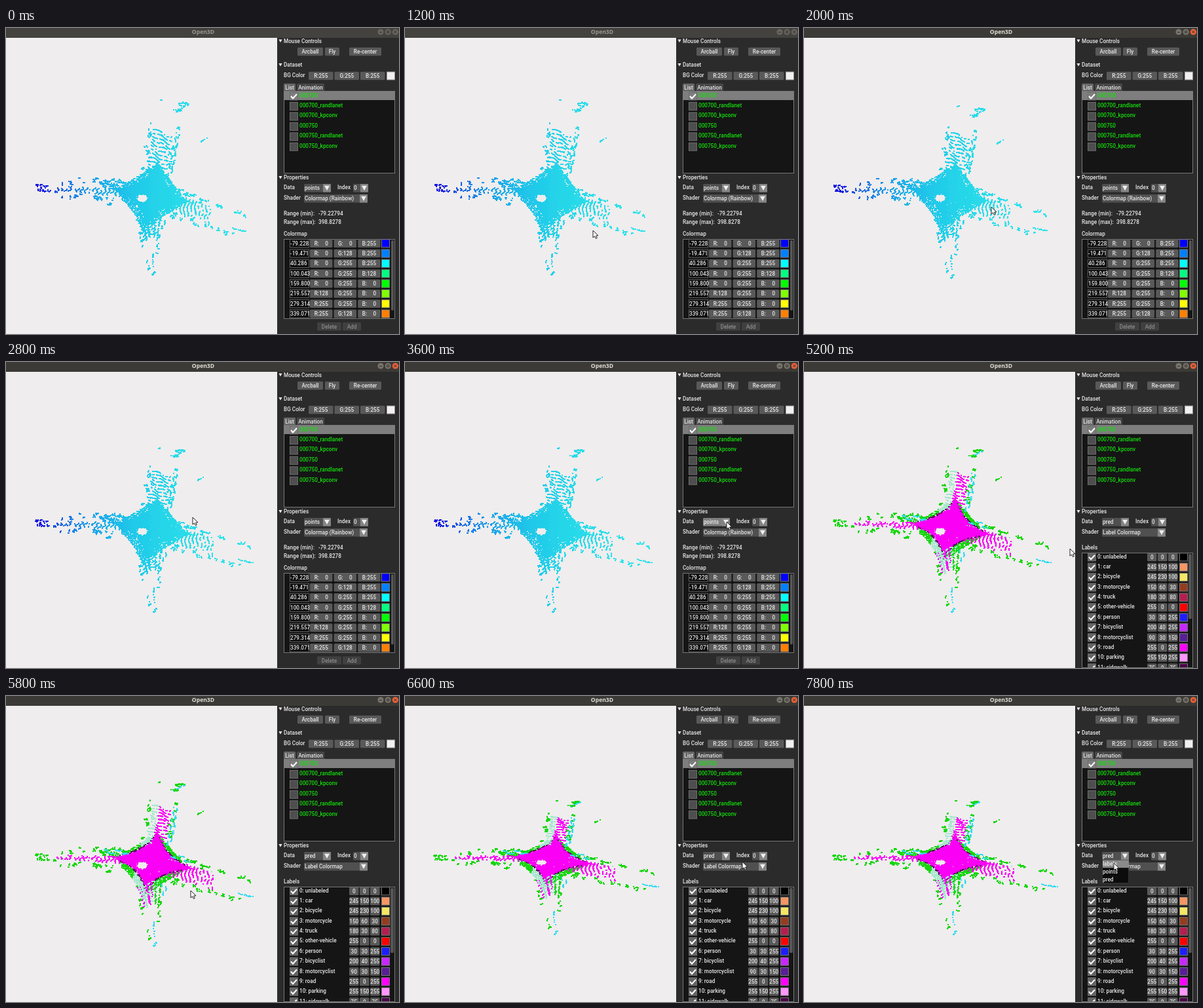
Write an HTML page with a canvas that moves like this. It is 600 by 467 pixels and loops after 8 s.

```html
<!DOCTYPE html>
<html lang="en">
<head>
<meta charset="utf-8">
<title>Point cloud viewer</title>
<style>
html, body { margin: 0; width: 100%; height: 100%; overflow: hidden; background: #efedee; }
canvas { display: block; width: 100%; height: 100%; }
</style>
</head>
<body>
<canvas id="stage" width="600" height="467"></canvas>
<script>
const ctx = document.getElementById('stage').getContext('2d');
const LOOP = 8000, STEP = 200;
const ROAD = '#fa00f5', WALK = '#a5e8cc', TREE = '#16d60c', WALL = '#35dcf0', CURB = '#5a0a5e';

// ---------- helpers ----------
let seed = 7;
function rnd() {
  seed = (seed + 0x6D2B79F5) | 0;
  let v = Math.imul(seed ^ (seed >>> 15), 1 | seed);
  v = (v + Math.imul(v ^ (v >>> 7), 61 | v)) ^ v;
  return ((v ^ (v >>> 14)) >>> 0) / 4294967296;
}
const mix = (a, b, k) => a + (b - a) * k;
const jit = r => (rnd() * 2 - 1) * r;
const clamp = (v, lo, hi) => Math.min(hi, Math.max(lo, v));

// ---------- point cloud ----------
const CX = 208, CY = 260;
const points = [];

function rainbow(x) {
  const hue = clamp(182 + 58 * Math.exp((55 - x) / 70), 180, 240);
  return `hsl(${Math.round(hue)}, 82%, ${Math.round(47 + x / 40)}%)`;
}

// The scanner leaves an empty spot around itself
function dot(x, y, label) {
  if (Math.hypot((x - CX) / 9, (y - CY) / 6) < 0.8 + rnd() * 0.25) return;
  points.push({ x: x - CX, y: y - CY, label, hue: rainbow(x + jit(3)) });
}

function blob(x, y, rx, ry, label) {
  for (let n = Math.max(3, rx * ry * 0.9); n > 0; n--) {
    const a = rnd() * Math.PI * 2, r = Math.sqrt(rnd());
    dot(x + Math.cos(a) * r * rx, y + Math.sin(a) * r * ry, label);
  }
}

function line(x0, y0, x1, y1, label) {
  const len = Math.hypot(x1 - x0, y1 - y0);
  for (let d = 0; d < len; d += rnd() < 0.15 ? 3 : 0.8)
    dot(mix(x0, x1, d / len) + jit(0.8), mix(y0, y1, d / len) + jit(0.8), label);
}

// Star-shaped road surface with pavements and trees in its corners
function crossing(cx, cy) {
  for (let y = -56; y < 56; y += 1.6) {
    for (let x = -70; x < 70; x += 1.6) {
      const p = 0.97 * x + 0.2 * y, q = 0.17 * x - 0.98 * y;
      const star = Math.pow(Math.abs(p) / 70, 0.6) + Math.pow(Math.abs(q) / (q > 0 ? 58 : 48), 0.6);
      const edge = Math.abs(p) / 54 + Math.abs(q) / 50;
      const label = star < 1 ? ROAD : star < 1.05 ? CURB : p < 0 && p > -22 ? WALK : TREE;
      if (star < 1 || (edge < 1 && rnd() < 0.8)) dot(cx + x + jit(0.3), cy + y + jit(0.3), label);
    }
  }
}

// One street: scan arcs across the road, trees and a stepped wall beside it
function arm({ from: [x0, y0], to: [x1, y1], half, end = half, arcs, reach, slant = 0, road = -1, trees, spread, wall, wallEnd }) {
  const len = Math.hypot(x1 - x0, y1 - y0), ux = (x1 - x0) / len, uy = (y1 - y0) / len;
  const put = (draw, u, v, ...rest) =>
    draw(x0 + ux * u * len - uy * v, y0 + uy * u * len + ux * v, ...rest);

  for (let i = 0; i < arcs; i++) {
    const u = i / arcs * reach, w = mix(half, end, u) * (0.85 + rnd() * 0.25);
    for (let v = -1; v <= 1; v += 0.8 / w) {
      if (rnd() < 0.02 + u * 0.12) { v += 3 / w; continue; }
      const wave = slant * v + 1.5 * Math.sin(4 * v + i * 0.8);
      put(dot, u + (wave + jit(0.4)) / len, v * w, v > road ? ROAD : WALK);
    }
  }
  for (let i = 0; i < trees; i++) {
    const u = rnd(), side = rnd() < 0.5 ? -1 : 1;
    const v = side * (mix(half, end, u) + 1 + rnd() * spread);
    put(blob, u, v, 1 + rnd() * 4 * (1 - u / 2), 1 + rnd() * 2.2, TREE);
  }
  for (let u = 0; u < wallEnd; u += 0.9 / len) {
    const v = half + 5 + Math.floor(u * 12) % 2 * 5;
    if (rnd() < 0.8) put(dot, u, wall * v + jit(1.2), WALL);
  }
}

function buildCloud() {
  crossing(222, 256);
  arm({ from: [228, 224], to: [244, 144], half: 14, end: 17, arcs: 13, reach: 0.85, slant: -4,
    road: -0.3, trees: 24, spread: 6, wall: 1, wallEnd: 0.85 });
  arm({ from: [246, 264], to: [362, 303], half: 13, arcs: 13, reach: 0.6, slant: 3,
    trees: 38, spread: 8, wall: -1, wallEnd: 0.25 });
  arm({ from: [186, 252], to: [60, 243], half: 6, end: 3, arcs: 19, reach: 0.88, slant: -2,
    trees: 46, spread: 13, wall: 1, wallEnd: 0.3 });
  arm({ from: [216, 290], to: [225, 368], half: 15, end: 3, arcs: 7, reach: 0.4, slant: 4,
    road: 0.7, trees: 15, spread: 3, wall: -1, wallEnd: 0.25 });

  // streaks towards the lower end, where the beams converge
  for (let i = 0; i < 6; i++)
    line(200 + i * 7, 286, 211 + i * 4, 304 + rnd() * 24, i < 2 ? WALK : i < 4 ? ROAD : TREE);
  line(224, 345, 225, 364, WALL);
  line(223, 377, 228, 371, WALL);

  // far ends
  blob(271, 116, 9, 3.5, TREE);
  line(279, 116, 260, 128, WALL);
  blob(262, 126, 6, 2.5, TREE);
  blob(237, 110, 2, 1.5, TREE);
  line(297, 174, 307, 168, TREE);
  line(347, 306, 366, 311, WALL);
  for (let i = 0; i < 5; i++) blob(49 + i * 3, 240 + i * 7 % 13, 3.5, 2.5, TREE);
}

// Perspective view of the ground, tilted in equal turns
function drawCloud(turn, labelled) {
  const angle = 0.37 * turn, squash = Math.cos(angle), depth = Math.sin(angle) / 420;
  const cy = CY - 1.5 * turn * turn, zoom = 1 + 0.02 * turn;
  for (const { x, y, label, hue } of points) {
    const s = zoom / (1 - y * depth);
    ctx.fillStyle = labelled ? label : hue;
    ctx.fillRect(Math.round(CX + x * s) - 1, Math.round(cy + y * s * squash - 0.015 * turn * x) - 1, 2, 2);
  }
}

// ---------- widgets ----------
const FONT = 'Roboto, Arial, sans-serif';
function rect(x, y, w, h, fill) {
  ctx.fillStyle = fill;
  ctx.fillRect(x, y, w, h);
}
function frame(x, y, w, h, fill, edge) {
  rect(x, y, w, h, edge);
  rect(x + 1, y + 1, w - 2, h - 2, fill);
}
function text(s, x, y, color = '#e8e8e8', align = 'left') {
  ctx.font = '500 8.2px ' + FONT;
  ctx.textAlign = align;
  ctx.textBaseline = 'middle';
  ctx.fillStyle = color;
  ctx.fillText(s, x, y + 0.6);
}
function round(x, y, w, h, fill) {
  ctx.fillStyle = fill;
  ctx.beginPath();
  ctx.roundRect(x, y, w, h, 1.5);
  ctx.fill();
}
function button(s, x, y, w, fill = '#595959', color) {
  round(x, y - 6.3, w, 12.6, fill);
  text(s, x + w / 2, y, color, 'center');
}
function poly(fill, ...p) {
  ctx.fillStyle = fill;
  ctx.beginPath();
  for (let i = 0; i < p.length; i += 2) ctx.lineTo(p[i], p[i + 1]);
  ctx.closePath();
  ctx.fill();
}
function down(x, y, r) {
  poly('#f0f0f0', x - r, y - r * 0.8, x + r, y - r * 0.8, x, y + r);
}
function section(s, y) {
  down(419, y, 2.6);
  text(s, 424, y);
}
function combo(s, x, y, w, [mx, my]) {
  const hover = mx > x && mx < x + w && Math.abs(my - y) < 7;
  round(x, y - 6, w, 12.5, hover ? '#808080' : '#505050');
  text(s, x + 1, y);
  rect(x + w - 12, y - 6, 12, 12.5, '#858585');
  down(x + w - 6, y, 4);
}
function check(x, y, on, fill = '#4e4e4e') {
  frame(x, y - 6.5, 13, 13, fill, '#6c6c6c');
  if (!on) return;
  ctx.strokeStyle = '#fff';
  ctx.lineWidth = 2;
  ctx.beginPath();
  ctx.moveTo(x + 2, y);
  ctx.lineTo(x + 5, y + 3.5);
  ctx.lineTo(x + 11, y - 3);
  ctx.stroke();
}
function swatch(y, rgb) {
  frame(573, y - 6.5, 13, 13, `rgb(${rgb})`, '#777');
}
function clipped(x, y, w, h, draw) {
  ctx.save();
  ctx.beginPath();
  ctx.rect(x, y, w, h);
  ctx.clip();
  draw();
  ctx.restore();
}

// ---------- window parts ----------
function drawTitle(active) {
  rect(0, 0, 600, 15, active ? '#3c3a36' : '#44423e');
  ctx.font = 'bold 8.6px "Noto Sans", sans-serif';
  ctx.textAlign = 'center';
  ctx.textBaseline = 'middle';
  ctx.fillStyle = active ? '#e2ded6' : '#9b9892';
  ctx.fillText('Open3D', 301, 6.5);
  for (let i = 0; i < 3; i++) {
    const x = 572 + i * 11.2;
    ctx.fillStyle = !active ? '#67645e' : i === 2 ? '#ee6238' : '#77736b';
    ctx.beginPath();
    ctx.arc(x, 6, 4.6, 0, 7);
    ctx.fill();
    ctx.strokeStyle = '#34322f';
    ctx.lineWidth = 1;
    ctx.beginPath();
    if (i === 0) { ctx.moveTo(x - 2, 6.5); ctx.lineTo(x + 2, 6.5); }
    else if (i === 1) ctx.rect(x - 1.5, 4.5, 3, 3);
    else {
      ctx.moveTo(x - 2, 4); ctx.lineTo(x + 2, 8);
      ctx.moveTo(x + 2, 4); ctx.lineTo(x - 2, 8);
    }
    ctx.stroke();
  }
}

const ITEMS = ['000700', '000750'].flatMap(s => [s, s + '_randlanet', s + '_kpconv']);

function drawPanel(data, shader, mouse) {
  rect(414, 14, 186, 453, '#2b2b2b');
  section('Mouse Controls', 19.5);
  button('Arcball', 445, 36, 39);
  button('Fly', 487, 36, 22);
  button('Re-center', 524, 36, 49);
  section('Dataset', 56);
  text('BG Color', 424, 72);
  ['R:255', 'G:255', 'B:255'].forEach((s, i) => button(s, 462 + i * 39.5, 73, 37.5));
  frame(581, 66.5, 13, 13, '#f2f0f1', '#999');
  button('List', 424, 91, 18, '#686868');
  button('Animation', 444, 91, 42, '#474747');

  frame(424, 96, 170, 126, '#151515', '#777');
  clipped(424, 97, 170, 124, () => {
    rect(424, 97, 170, 13, '#7e7e7e');
    ITEMS.forEach((s, i) => {
      const y = 102.5 + i * 15.45;
      check(433, y + 1.5, i === 0, i ? '#4e4e4e' : '#7e7e7e');
      text(s, 448, y, '#14e00c');
    });
  });

  section('Properties', 228);
  text('Data', 424, 243);
  combo(data, 455, 244, 41, mouse);
  text('Index', 506, 243);
  combo('0', 530, 244, 23, mouse);
  text('Shader', 424, 259);
  combo(shader, 455, 260, 97, mouse);
}

function drawColormap() {
  const min = -79.22794, max = 398.8278;
  text('Range (min):', 424, 283);
  text(min, 477, 283);
  text('Range (max):', 424, 296);
  text(max, 477, 296);
  text('Colormap', 424, 314);
  frame(424, 322, 170, 122, '#151515', '#777');
  for (let i = 0; i < 8; i++) {
    const y = 328.7 + i * 15.35;
    const rgb = [i - 4, Math.min(i, 8 - i), 4 - i].map(n => clamp(n * 128, 0, 255));
    frame(433, y - 6.5, 30, 13, '#0a0a0a', '#606060');
    text(mix(min, max, i / 8).toFixed(3), 434, y);
    rgb.forEach((n, j) =>
      button('RGB'[j] + ':' + String(n).padStart(3, '\u2007'), 464 + j * 36.6, y, 34.5));
    swatch(y, rgb);
  }
  round(588, 324, 4, 107, '#555');
  button('Delete', 475, 455.5, 37, '#404040', '#8c8c8c');
  button('Add', 514, 455.5, 28, '#404040', '#8c8c8c');
}

const CLASSES = [
  ['unlabeled', 0, 0, 0], ['car', 245, 150, 100], ['bicycle', 245, 230, 100],
  ['motorcycle', 150, 60, 30], ['truck', 180, 30, 80], ['other-vehicle', 255, 0, 0],
  ['person', 30, 30, 255], ['bicyclist', 200, 40, 255], ['motorcyclist', 90, 30, 150],
  ['road', 255, 0, 255], ['parking', 255, 150, 255], ['sidewalk', 75, 0, 75]
];

function drawLabels() {
  text('Labels', 424, 283);
  frame(424, 291, 170, 176, '#151515', '#777');
  clipped(425, 292, 168, 174, () => {
    CLASSES.forEach(([name, ...rgb], i) => {
      const y = 296.7 + i * 15.35;
      check(433, y + 1, true, '#646464');
      text(i + ': ' + name, 448, y);
      rgb.forEach((n, j) => button(n, 524 + j * 16, y + 1, 14.5));
      swatch(y + 1, rgb);
    });
    round(587, 293, 5, 99, '#555');
  });
}

function drawMenu(y) {
  frame(455, 250, 41, 36, '#0c0c0c', '#333');
  ['labels', 'points', 'pred'].forEach((s, i) => {
    const top = 250.5 + i * 11.7;
    if (y >= top && y < top + 11.7) rect(456, top, 40, 11.7, '#8a8a8a');
    text(s, 456, top + 5.8);
  });
}

function drawCursor([x, y]) {
  ctx.save();
  ctx.translate(x, y);
  poly('#fff', 0, 0, 0, 11, 2.6, 8.8, 4.4, 12.4, 6.2, 11.6, 4.6, 8, 8, 7.8);
  ctx.strokeStyle = '#222';
  ctx.lineWidth = 1;
  ctx.stroke();
  ctx.restore();
}

// ---------- timeline ----------
// Pointer rests: arrival, departure, x, y
const RESTS = [
  [1000, 1000, 345, 372], [1200, 1600, 287, 309], [2400, 2800, 285, 237], [3600, 4000, 491, 244],
  [4600, 4600, 473, 270], [4800, 5000, 468, 279], [5600, 5800, 282, 297], [6200, 6200, 284, 245],
  [6600, 6600, 515, 253], [7200, 7400, 490, 244], [7800, 8000, 473, 255]
];
const ramp = (t, a, b) => clamp((t - a) / (b - a), 0, 1);

function pointer(t) {
  const next = RESTS.findIndex(r => t <= r[1]);
  const a = RESTS[Math.max(0, next - 1)], b = RESTS[next];
  const k = ramp(t, a[1], b[0]);
  return [mix(a[2], b[2], k), mix(a[3], b[3], k)];
}

function render(t) {
  const labelled = t >= 5000;
  const menu = (t >= 4200 && t < 5000) || t >= 7400;
  const mouse = pointer(t);
  rect(0, 0, 600, 467, '#efedee');
  drawCloud(ramp(t, 1600, 2400) + ramp(t, 5800, 6200), labelled);
  drawPanel(labelled ? 'pred' : 'points', labelled ? 'Label Colormap' : 'Colormap (Rainbow)', menu ? [0, 0] : mouse);
  if (labelled) drawLabels();
  else drawColormap();
  if (menu) drawMenu(mouse[1]);
  drawTitle(t >= 1600);
  if (t >= 1000) drawCursor(mouse);
}

buildCloud();
let last = -1;
function tick() {
  const t = Math.floor(performance.now() % LOOP / STEP) * STEP;
  if (t !== last) render(last = t);
  requestAnimationFrame(tick);
}
tick();
</script>
</body>
</html>
```
